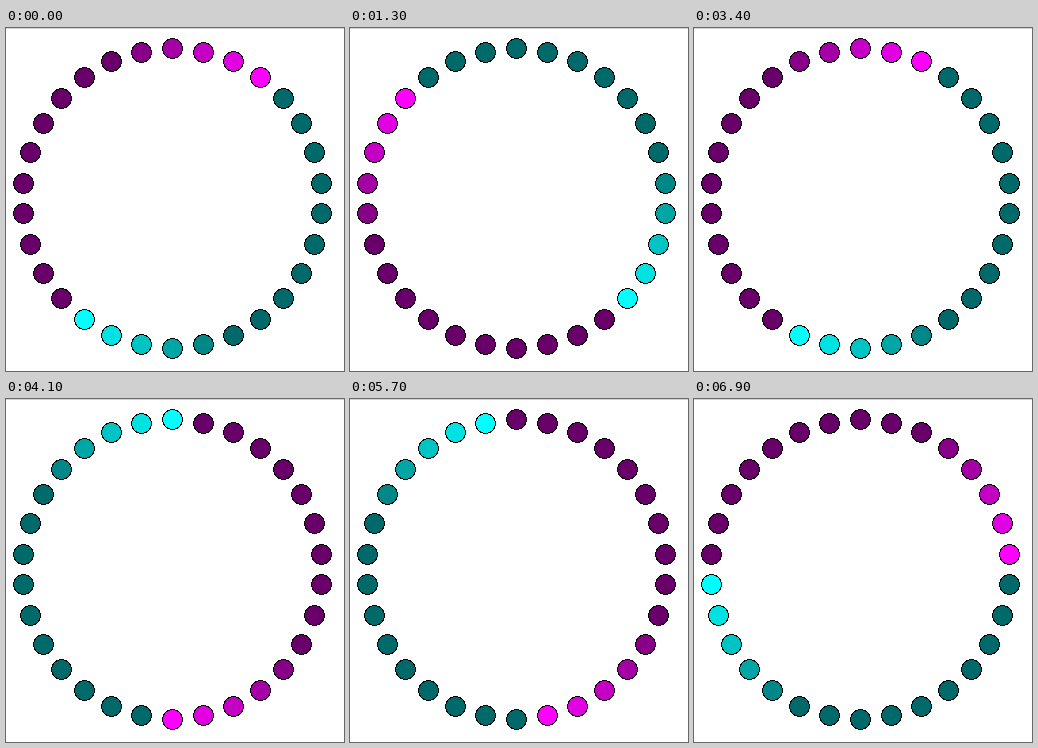
An HTML page that plays this animation: 338x343 px, repeating every 7 s.

```html
<!DOCTYPE html>
<html lang="en">
<head>
<meta charset="utf-8">
<title>Chasing dots</title>
<style>
  html, body { margin: 0; width: 100%; height: 100%; overflow: hidden; background: #fff; }
  svg { display: block; shape-rendering: crispEdges; }
  circle { stroke: #000; stroke-width: 1; }
</style>
</head>
<body>
<svg width="338" height="343" viewBox="0 0 338 343">
  <rect width="338" height="1" fill="#d4d4d4"/>
</svg>
<script>
const COUNT = 30, HALF = COUNT / 2, RADIUS = 150;
const TICK = 100, LOOP = 7000, PAUSE_TICK = 25, START = 3;
const svg = document.querySelector('svg');

// Whole-pixel offset, tolerant of floating-point error
const offset = v => Math.trunc(v * RADIUS * 1.000001);

const dots = Array.from({ length: COUNT }, (_, i) => {
  const angle = i * 2 * Math.PI / COUNT;
  const dot = document.createElementNS(svg.namespaceURI, 'circle');
  dot.setAttribute('cx', 166.5 + offset(Math.sin(angle)));
  dot.setAttribute('cy', 170.5 - offset(Math.cos(angle)));
  dot.setAttribute('r', 10);
  return svg.appendChild(dot);
});

// Position of the magenta head: slightly accelerating, with one held tick
function headAt(time) {
  const tick = Math.floor(time % LOOP / TICK);
  const n = tick < PAUSE_TICK ? tick : tick - 1;
  return START + Math.round(1.74 * n + 0.0012 * n * n);
}

function draw(time) {
  const head = headAt(time);
  dots.forEach((dot, i) => {
    const behind = (head - i + COUNT * 10) % COUNT;
    const level = Math.max(105, 255 - 30 * (behind % HALF));
    dot.setAttribute('fill', behind < HALF
      ? `rgb(${level},0,${level})`
      : `rgb(0,${level},${level})`);
  });
}

let start;
function frame(now) {
  start ??= now;
  draw(now - start);
  requestAnimationFrame(frame);
}
draw(0);
requestAnimationFrame(frame);
</script>
</body>
</html>
```
